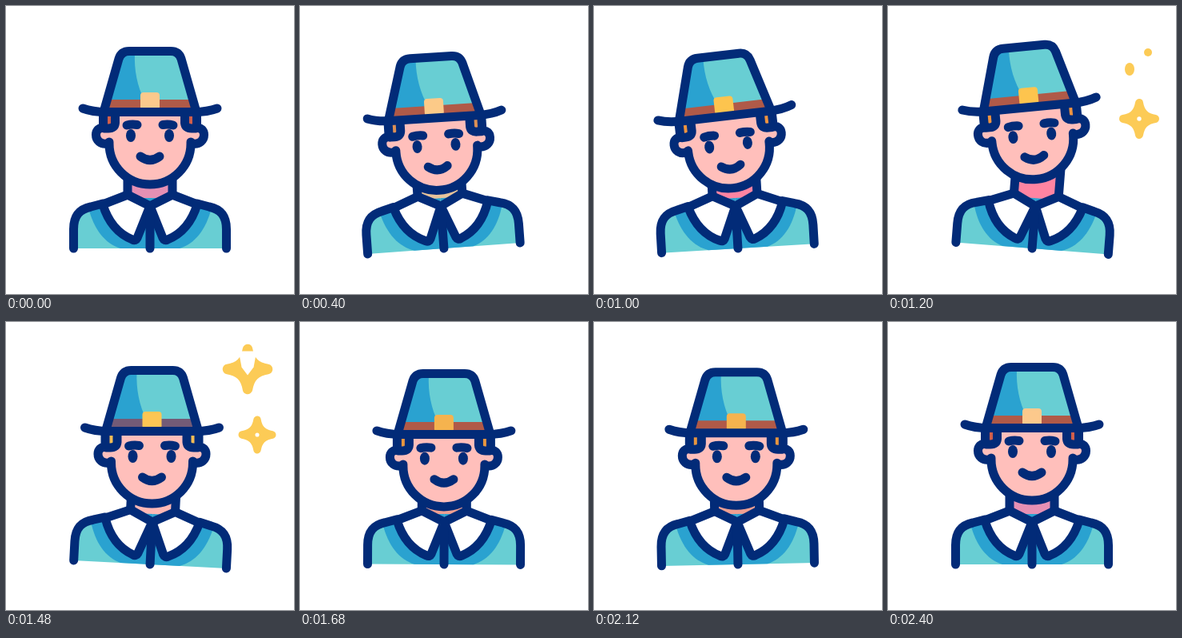
Write an HTML page that moves like this. It is 360 by 360 pixels and loops after 2.6 s.

```html
<!DOCTYPE html>
<html lang="en">
<head>
<meta charset="utf-8">
<title>Bowing man in a hat</title>
<style>
  html, body { margin: 0; width: 100%; height: 100%; overflow: hidden; background: #fff; }
  svg { display: block; width: 100vw; height: 100vh; }
  .line { fill: none; stroke: #022b78; stroke-width: 11; stroke-linecap: round; stroke-linejoin: round; }
  .star { fill: #fccb56; stroke: #fccb56; stroke-width: 10; stroke-linejoin: round; }
  .navy { fill: #022b78; }
  .teal { fill: #68ced3; }
  .blue { fill: #2aa2d0; }
  .skin { fill: #ffbfbb; }
  .white { fill: #fff; }
  .buckle { fill: var(--buckle); }
  .neck { fill: var(--neck); }
  .band { fill: var(--band); }
  .hair { fill: var(--hair); }
</style>
</head>
<body>
<svg id="stage" viewBox="0 0 360 360">
  <defs>
    <path id="spark" class="star" d="M0-20C2-8 8-2 20 0C8 2 2 8 0 20C-2 8-8 2-20 0C-8-2-2-8 0-20Z"/>
    <g id="collar">
      <path class="blue" d="M103 252C110 280 124 297 143 303H180V240H150Z"/>
      <path class="line white" style="fill:#fff" d="M152 236L121 248Q131 281 158 292Q162 294 164 290L180 250Z"/>
      <path class="line" d="M84.500 303V279C84.500 262 92 254 106 251L121 247"/>
    </g>
    <g id="ear">
      <circle class="skin" cx="123" cy="162" r="11"/>
      <path class="hair" d="M124 134H134V148H124Z"/>
      <path class="line" d="M121.500 135V148M136.500 135V146Q136 153 128 153H123C116 151 112.500 156 112.500 161C112.500 168 118 173 126 172"/>
    </g>
  </defs>

  <g id="body">
    <path class="neck" d="M152 200H208V236L180 250L152 236Z"/>
    <path class="line" d="M152 200V236M208 200V236"/>
    <path class="teal" d="M84 303V279C84 262 92 254 106 251L152 236L180 250L208 236L254 251C268 254 276 262 276 279V303Z"/>
    <use href="#collar"/>
    <use href="#collar" transform="matrix(-1 0 0 1 360 0)"/>
    <path class="line" d="M180 250V303"/>
  </g>

  <g id="head">
    <path class="skin" d="M129 135V172a51 51 0 0 0 102 0V135Z"/>
    <use href="#ear"/>
    <use href="#ear" transform="matrix(-1 0 0 1 360 0)"/>
    <path class="line" d="M129 170V172a51 51 0 0 0 102 0V170"/>
    <g id="face">
      <path class="line" d="M151 149Q157 147.500 164 148.500M196 148.500Q203 147.500 209 149M168 188Q180 197 192 188"/>
      <ellipse class="navy" cx="156" cy="162" rx="6" ry="8"/>
      <ellipse class="navy" cx="204" cy="162" rx="6" ry="8"/>
    </g>
    <path class="teal" d="M123 130L141 66Q144 56.500 154 56.500H206Q216 56.500 219 66L237 130Z"/>
    <path class="blue" d="M145 58H161C160 80 164 100 173 118H127Z"/>
    <path class="band" d="M127 117H233L237 130H123Z"/>
    <rect class="buckle" x="168" y="108" width="24" height="22" rx="4"/>
    <path class="line" d="M123 129L141 66Q144 56.500 154 56.500H206Q216 56.500 219 66L237 129"/>
    <path class="line" d="M96 128Q108 132.500 125 132.500H235Q252 132.500 264 128"/>
  </g>

  <g id="small">
    <use href="#spark"/>
    <circle class="white" r="2.700"/>
  </g>
  <g id="buds" fill="#fccb56">
    <ellipse cx="302" cy="79" rx="6" ry="8"/>
    <circle cx="325" cy="58" r="5"/>
  </g>
  <g id="big">
    <use href="#spark"/>
    <path id="gap" class="white" d="M-9-18H9L6-2L0 6L-6-2Z"/>
  </g>
</svg>

<script>
const LOOP = 2600, STEP = 40;
const part = id => document.getElementById(id);

// time, head x, head y, head angle, body angle, face drop
const pose = [
  [240, 180, 128, 0, 0, 0],
  [400, 168, 135.5, -3.7, -4.2, 5],
  [640, 155, 144, -7, -10.2, 7],
  [800, 154, 144.5, -7.1, -10.5, 7],
  [1200, 176.5, 122, -5.5, 4.5, 6],
  [1320, 180, 122.5, -3, 5, 4],
  [1480, 182.5, 132, 0, 3, 2],
  [1920, 176.5, 138, 0, -1.8, 0],
  [2400, 180, 128, 0, 0, 0]
];
const smallSize = [[1040, 0], [1200, 1], [1340, 1.12], [1480, .94], [1640, 0]];
const bigSize = [[1280, 0], [1320, .93], [1400, 1.44], [1480, 1.25], [1600, 0]];

// time, buckle, neck, hat band, hair
const tints = [
  [0, '#fcc98c', '#e690b4', '#b05a48', '#cf5f4b'],
  [280, '#fcca88', '#e6c39a', '#b05a48', '#dc9055'],
  [680, '#fdc287', '#e6c39a', '#b05a48', '#b85c48'],
  [1000, '#fdc44e', '#ff84a2', '#b05a48', '#ef9440'],
  [1360, '#fdc654', '#ffb8b5', '#735b77', '#f5bd55'],
  [1680, '#f5b34e', '#ee9f92', '#b05a48', '#e8963f'],
  [2240, '#fcc98c', '#e690b4', '#b05a48', '#cf5f4b']
];

// Smooth interpolation that never overshoots a key.
function track(keys, t) {
  const last = keys.length - 1;
  if (t <= keys[0][0]) return keys[0].slice(1);
  if (t >= keys[last][0]) return keys[last].slice(1);
  const i = keys.findIndex(k => k[0] > t) - 1;
  const [a, b] = [keys[i], keys[i + 1]];
  const span = b[0] - a[0], u = (t - a[0]) / span;
  const slope = (n, c) => (keys[n + 1][c] - keys[n][c]) / (keys[n + 1][0] - keys[n][0]);
  const tangent = (n, c) => {
    if (n === 0 || n === last) return 0;
    const p = slope(n - 1, c), q = slope(n, c);
    return p * q > 0 ? 2 * p * q / (p + q) : 0;
  };
  return a.slice(1).map((from, j) => {
    const c = j + 1, s = u * u * (3 - 2 * u);
    return from + (b[c] - from) * s
      + span * u * (1 - u) * ((1 - u) * tangent(i, c) - u * tangent(i + 1, c));
  });
}

const place = (id, transform) => part(id).setAttribute('transform', transform);
const show = (id, on) => part(id).style.display = on ? '' : 'none';

function draw(now) {
  const t = Math.floor(now % LOOP / STEP) * STEP;
  const [x, y, tilt, lean, drop] = track(pose, t);
  place('body', `rotate(${lean} 180 304)`);
  place('head', `translate(${x} ${y}) rotate(${tilt}) translate(-180 -128)`);
  place('face', `translate(0 ${drop})`);
  place('small', `translate(314 141) scale(${track(smallSize, t)[0]})`);
  place('big', `translate(302 59) scale(${track(bigSize, t)[0]})`);
  show('buds', t >= 1120 && t < 1320);
  show('gap', t >= 1440);

  const tint = tints.filter(k => k[0] <= t).pop();
  ['buckle', 'neck', 'band', 'hair'].forEach((name, i) =>
    part('stage').style.setProperty('--' + name, tint[i + 1]));
}

const start = performance.now();
function tick() {
  draw(performance.now() - start);
  requestAnimationFrame(tick);
}
tick();
</script>
</body>
</html>
```
